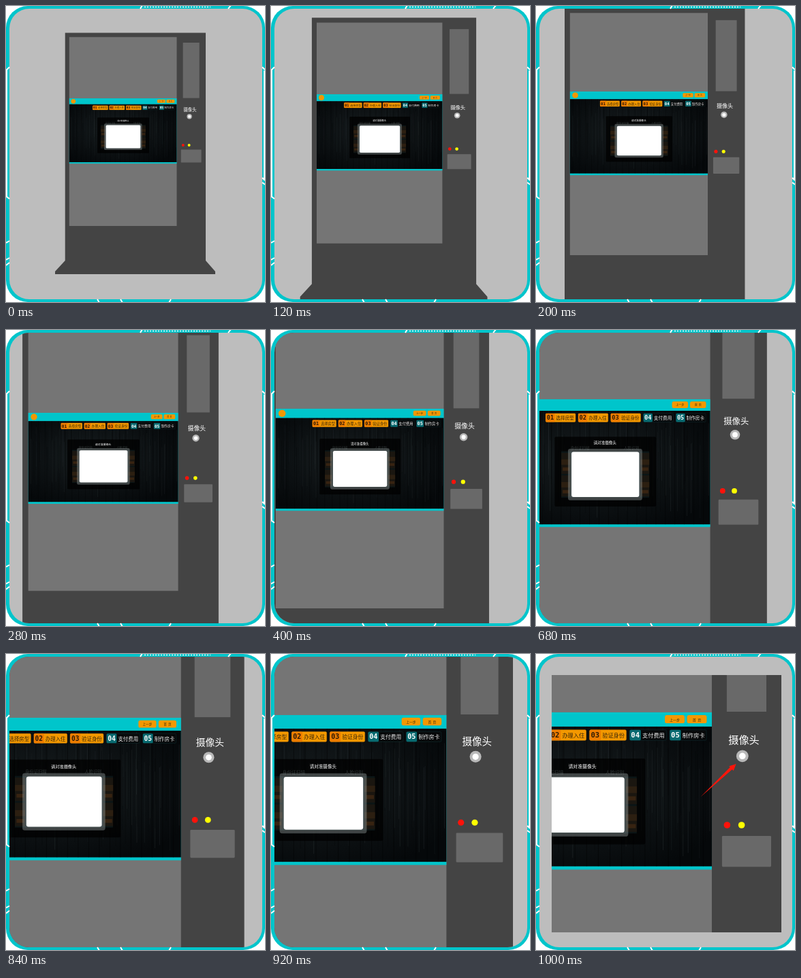
An HTML page that plays this animation: 380 px wide and 436 px high, repeating every 4000 ms.

```html
<!DOCTYPE html>
<html lang="zh-CN">
<head>
<meta charset="utf-8">
<title>Kiosk camera zoom</title>
<style>
  html, body { margin: 0; width: 100%; height: 100%; overflow: hidden; background: #fff; }
  svg { display: block; width: 100%; height: 100%; }
  text { font-family: "Noto Sans CJK SC", "Noto Sans CJK", "Noto Sans", sans-serif; text-anchor: middle; dominant-baseline: central; }
  .digits { font-family: "DejaVu Sans Mono", monospace; font-weight: bold; }
</style>
</head>
<body>
<svg viewBox="0 0 380 436">
  <defs>
    <clipPath id="window"><rect id="windowRect"/></clipPath>
    <radialGradient id="glow" cx=".45" cy=".45" r=".65">
      <stop offset="0" stop-color="#171d1f"/>
      <stop offset="1" stop-color="#05080a"/>
    </radialGradient>
  </defs>

  <rect width="380" height="436" rx="32" fill="#00c5cb"/>
  <rect x="5" y="4" width="371" height="428" rx="29" fill="#bdbdbd"/>

  <g clip-path="url(#window)">
    <g id="kiosk">
      <path d="M86.7 39.5H293V375L307 391V395H72V391L86.7 375Z" fill="#444"/>
      <path d="M92.8 45.8H250.5V324H92.8Z" fill="#757575"/>

      <rect x="92.8" y="136" width="157.7" height="96.1" fill="#00c5cb"/>
      <rect x="92.8" y="144.7" width="157.7" height="85.4" fill="url(#glow)"/>
      <g id="grain"></g>
      <circle cx="98.8" cy="140.3" r="3.4" fill="#f39800"/>
      <g id="buttons"></g>
      <g id="steps"></g>

      <rect x="134" y="164.2" width="76" height="52.5" rx="1" fill="#000" opacity=".76"/>
      <rect x="138.9" y="175.2" width="65.9" height="34.8" fill="#0b1516"/>
      <g id="thumbnails" opacity=".7"></g>
      <g fill="#2f3535" font-size="2.9">
        <text x="153" y="172.5">身份证扫描</text>
        <text x="191.5" y="172.5">人脸识别</text>
      </g>
      <rect x="144" y="173.3" width="55.6" height="38.6" rx="1.5" fill="#a0aaaa" opacity=".38"/>
      <rect x="146.6" y="175.6" width="50.7" height="33.9" rx="1.5" fill="#fff"/>
      <text x="171.7" y="168.8" font-size="2.85" font-weight="500" fill="#fff">请对准摄像头</text>

      <g fill="#696969">
        <rect x="259.6" y="54" width="24.1" height="81.6"/>
        <rect x="256.7" y="211.5" width="29.9" height="18.9" rx=".6"/>
      </g>
      <text x="270" y="152.2" font-size="6.3" fill="#fff">摄像头</text>
      <circle cx="269.1" cy="162.7" r="3.7" fill="#b8b8b8"/>
      <circle cx="269.1" cy="162.7" r="2" fill="#fff"/>
      <circle cx="259.8" cy="204.9" r="2" fill="#ff120a"/>
      <circle cx="268.6" cy="204.9" r="2" fill="#ff0"/>
    </g>
  </g>

  <path id="arrow" d="M241.5 210.5L284.8 166.7L283.2 165.2L293.5 162L289.8 172.1L287.8 170Z" fill="#ff150a"/>

  <g fill="none" stroke="#fff" stroke-width="2">
    <path d="M1 93V282M379 95V256"/>
    <path d="M203 1.5H300" stroke-width="1.5" stroke-dasharray="2 2"/>
    <path d="M0 95L5 90M0 280L5 284M0 349L5 346M0 374L5 371M0 382L5 378
             M376 90L380 94M376 253L380 257M376 260L380 263
             M197 4L200 -1M326 4L330 -1M134 432L137 437M168 432L171 437M242 432L239 437"/>
  </g>
</svg>
<script>
const byId = id => document.getElementById(id);
const rect = (x, y, w, h, fill, extra = '') =>
  `<rect x="${x}" y="${y}" width="${w}" height="${h}" fill="${fill}" ${extra}/>`;
const label = (x, y, size, fill, words, cls = '') =>
  `<text x="${x}" y="${y}" font-size="${size}" fill="${fill}" class="${cls}">${words}</text>`;

let seed = 7;
const random = () => (seed = seed * 16807 % 2147483647) / 2147483647;

// Wood: fine dark and pale streaks, with a dark seam between planks.
const streaks = Array.from({ length: 150 }, () => {
  const top = 144.7 + random() * 30, height = 25 + random() * 30;
  return rect(93 + random() * 157, top, .35, height, random() < .6 ? '#000' : '#4a5356',
    `opacity="${.08 + random() * .2}"`);
});
const seams = Array.from({ length: 22 }, (_, i) =>
  rect(96 + i * 7.1, 144.7, .4, 85.4, '#000', 'opacity=".45"'));
byId('grain').innerHTML = [...streaks, ...seams].join('');

byId('buttons').innerHTML = [[221.9, '上一步'], [235.4, '首&#160; 页']].map(([x, words]) =>
  rect(x, 137.7, 12, 5, '#f39800', 'rx="1.2"') + label(x + 6, 140.2, 2.1, '#3b2a10', words)).join('');

byId('steps').innerHTML = ['选择房型', '办理入住', '验证身份', '支付费用', '制作房卡'].map((words, i) => {
  const x = 127.3 + 24.4 * i, done = i < 3;
  return rect(x, 146.7, 22.3, 6.4, done ? '#f39800' : '#07090a', `rx=".7" stroke="${done ? '#e48c00' : '#12383b'}" stroke-width=".2"`)
    + rect(x, 146.7, 6.8, 6.4, done ? '#ee7d00' : '#086a70', 'rx=".7"')
    + label(x + 3.4, 149.9, 4.4, done ? '#2e1a06' : '#fff', '0' + (i + 1), 'digits')
    + label(x + 14.5, 149.8, 3.4, done ? '#3a2608' : '#eee', words);
}).join('');

byId('thumbnails').innerHTML = [139, 198.2].flatMap(x => [176.3, 193.3].map(y =>
  rect(x, y, 6.7, 15.8, '#21170e') + rect(x, y + 5, 6.7, 4, '#3b2410') + rect(x + 1, y + 11, 5, 2.5, '#4a2a10'))).join('');

const LOOP = 4000, STEP = 40, ZOOM_END = 1000;
const FOCUS = { x: 245.2, y: 171.5 };
const setWindow = (x, y, width, height, rx) =>
  Object.entries({ x, y, width, height, rx }).forEach(([name, value]) => byId('windowRect').setAttribute(name, value));

function draw(now) {
  const time = Math.min(ZOOM_END, Math.floor(now % LOOP / STEP) * STEP);
  const scale = 1 + 1.41 * time / ZOOM_END;
  const arrived = time === ZOOM_END;
  byId('kiosk').setAttribute('transform',
    `translate(${FOCUS.x} ${FOCUS.y}) scale(${scale}) translate(${-FOCUS.x} ${-FOCUS.y})`);
  if (arrived) setWindow(23, 31, 337, 379, 0);
  else setWindow(5, 4, 371, 428, 29);
  byId('arrow').style.display = arrived ? '' : 'none';
}

const start = performance.now();
function tick() {
  draw(performance.now() - start);
  requestAnimationFrame(tick);
}
tick();
</script>
</body>
</html>
```
